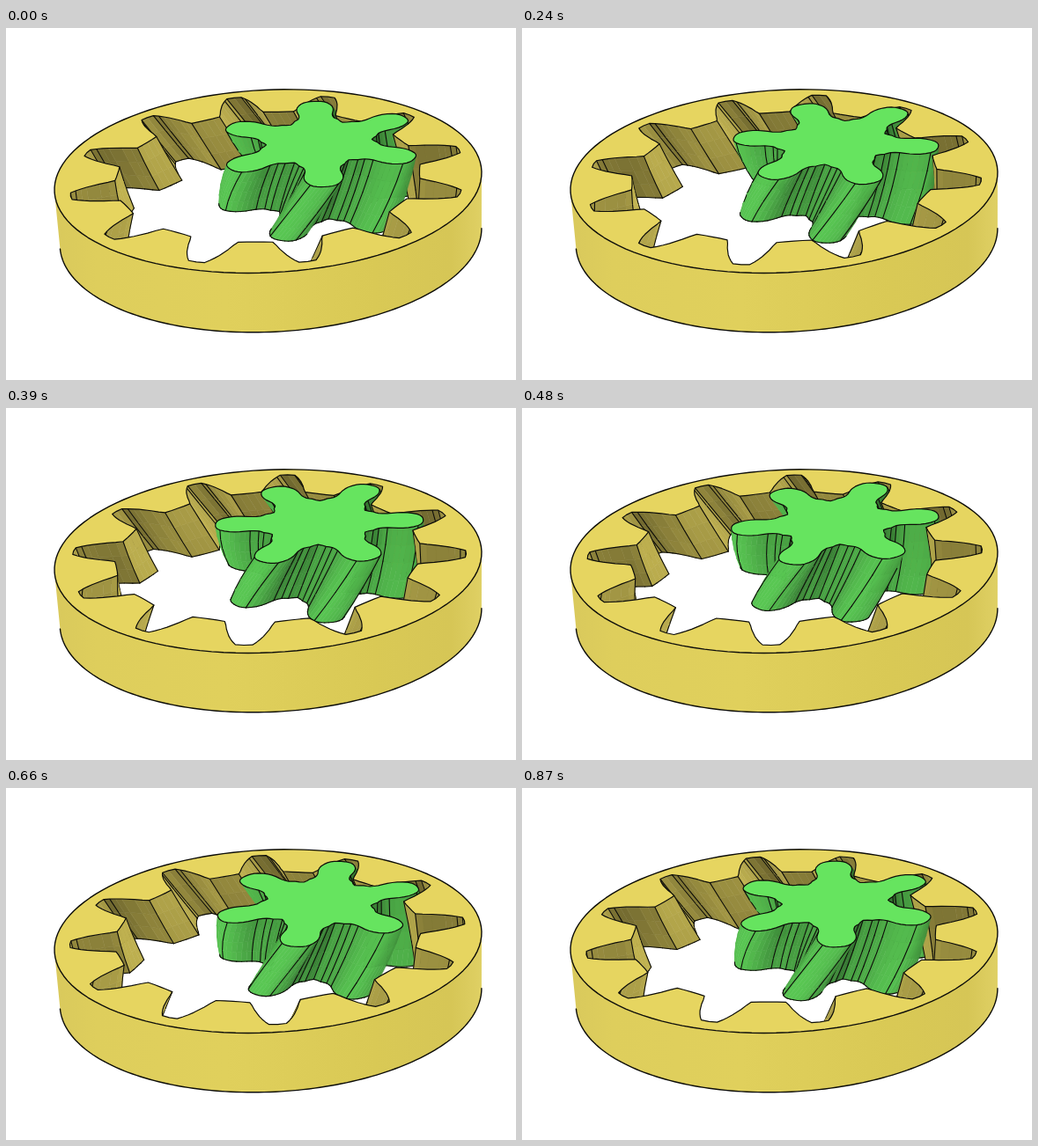
Recreate the animation shown at these times as an HTML page with a canvas. Size 579x400 px, loop 0.9 s.

```html
<!DOCTYPE html>
<html lang="en">
<head>
<meta charset="utf-8">
<title>Helical internal gear pair</title>
<style>
  html, body { margin: 0; width: 100%; height: 100%; overflow: hidden; background: #fff; }
  canvas { display: block; }
</style>
</head>
<body>
<canvas id="stage" width="579" height="400"></canvas>
<script>
const ctx = document.getElementById('stage').getContext('2d');
const RAD = Math.PI / 180;
const LOOP = 900, STEP = 30;

// Camera: the ring has radius 1, x points right, y to the viewer, h downwards.
const DIST = 9.457, FOCAL = 2285, SIN = 0.4255, COS = 0.905;
const ROLL = 2.8 * RAD, CX = 297, CY = 164.2;
const HEIGHT = 0.29;

function project(x, y, h) {
  const z = DIST - y * COS + h * SIN;
  const px = FOCAL * x / z, py = FOCAL * (y * SIN + h * COS) / z;
  return {
    x: CX + px * Math.cos(ROLL) + py * Math.sin(ROLL),
    y: CY - px * Math.sin(ROLL) + py * Math.cos(ROLL),
    z
  };
}

// Half outlines in polar form: radius, angle from the axis, edge mark.
const toPolar = ([a, w, edge]) => [Math.hypot(a, w), Math.atan2(w, a) / RAD, edge];

const pocket = [
  [0.929, 0, 0], [0.926, 2.3, 1], [0.902, 3.3, 1], [0.877, 4.2, 0], [0.85, 5.1, 0],
  [0.79, 6.8, 0], [0.75, 7.8, 0], [0.718, 8.9, 1], [0.713, 12, 0], [0.712, 15, 0]
];

const tooth = [
  [0.503, 0, 0], [0.498, 0.036, 0], [0.477, 0.066, 1], [0.43, 0.088, 0], [0.38, 0.091, 0],
  [0.33, 0.083, 1], [0.288, 0.088, 1], [0.262, 0.108, 1], [0.222, 0.128, 1]
].map(toPolar);

// Mirrors the half outline and repeats it round the wheel.
function wheel(half, count) {
  const back = half.slice(1).reverse().map(([r, a, e]) => [r, -a, e]);
  const unit = back.slice(1).concat(half);
  const pts = [];
  for (let i = 0; i < count; i++) {
    for (const [r, a, e] of unit) pts.push({ r, a: (a + i * 360 / count) * RAD, e });
  }
  return pts;
}

// Inserts a Catmull-Rom midpoint into every segment.
function smooth(pts) {
  const n = pts.length, out = [];
  const xy = pts.map(p => [p.r * Math.cos(p.a), p.r * Math.sin(p.a)]);
  pts.forEach((p, i) => {
    const mid = k => (9 * (xy[i][k] + xy[(i + 1) % n][k])
      - xy[(i + n - 1) % n][k] - xy[(i + 2) % n][k]) / 16;
    const x = mid(0), y = mid(1);
    out.push(p, { r: Math.hypot(x, y), a: Math.atan2(y, x), e: 0 });
  });
  return out;
}

const ring = {
  pts: wheel(pocket, 12), x: 0, y: 0, phase: 20.5, speed: 1, twist: 11.5, layers: 3,
  side: 1, color: [230, 213, 96],
  light: (nx, ny, r) => 0.48 + 0.08 * (0.93 - r) / 0.22 + 0.25 * Math.abs(nx) + 0.03 * nx
};

const pinion = {
  pts: smooth(wheel(tooth, 6)), x: 0.256, y: -0.317, phase: 29.5, speed: 2, twist: 25, layers: 4,
  side: -1, color: [102, 228, 95],
  light: (nx, ny, r) => 0.5 + 0.17 * (r - 0.25) / 0.25 + 0.2 * (0.8 * ny - 0.6 * nx)
};

const shade = (c, k) => `rgb(${c.map(v => Math.round(v * k)).join()})`;

function outline(gear, turn, depth) {
  const shift = (gear.phase - gear.speed * turn + gear.twist * depth) * RAD;
  return gear.pts.map(p => {
    const x = gear.x + p.r * Math.cos(p.a + shift);
    const y = gear.y + p.r * Math.sin(p.a + shift);
    return Object.assign(project(x, y, depth * HEIGHT), { wx: x, wy: y });
  });
}

function trace(pts, close = true) {
  pts.forEach((p, i) => i ? ctx.lineTo(p.x, p.y) : ctx.moveTo(p.x, p.y));
  if (close) ctx.closePath();
}

function stroke(pts, close, width = 1.2, color = '#0c0c08') {
  ctx.beginPath();
  trace(pts, close);
  ctx.lineWidth = width;
  ctx.strokeStyle = color;
  ctx.stroke();
}

// Collects the wall facets and edges that face the camera.
function walls(gear, turn, list) {
  const n = gear.pts.length, lift = 0.035;
  let top = outline(gear, turn, 0);
  for (let l = 1; l <= gear.layers; l++) {
    const low = outline(gear, turn, l / gear.layers);
    const front = top.map((p, i) => {
      const q = top[(i + 1) % n], b = low[i];
      return gear.side * ((q.x - p.x) * (b.y - p.y) - (q.y - p.y) * (b.x - p.x)) > 0;
    });
    for (let i = 0; i < n; i++) {
      const j = (i + 1) % n, p = top[i], q = top[j];
      const z = (p.z + q.z + low[i].z + low[j].z) / 4;
      if (front[i]) {
        const dx = q.wx - p.wx, dy = q.wy - p.wy;
        const len = Math.hypot(dx, dy) * -gear.side;
        const k = gear.light(dy / len, -dx / len, (gear.pts[i].r + gear.pts[j].r) / 2);
        list.push({ pts: [p, q, low[j], low[i]], z, fill: shade(gear.color, k) });
        if (l === gear.layers) list.push({ pts: [low[i], low[j]], z: z - lift });
      }
      if (gear.pts[i].e && (front[i] || front[(i + n - 1) % n])) {
        list.push({ pts: [p, low[i]], z: (p.z + low[i].z) / 2 - lift });
      }
    }
    top = low;
  }
}

function arc(from, to, h) {
  const pts = [];
  for (let i = 0; i <= 120; i++) {
    const a = (from + (to - from) * i / 120) * RAD;
    pts.push(project(Math.cos(a), Math.sin(a), h));
  }
  return pts;
}

const rim = arc(0, 360, 0);
const rimFront = arc(6.7, 173.3, 0);
const baseFront = arc(6.7, 173.3, HEIGHT);
const sideFill = ctx.createLinearGradient(55, 0, 540, 0);
[[0, '#d9c95c'], [0.1, '#dece5c'], [0.4, '#e0d05c'], [0.75, '#d9c955'], [0.93, '#d6c656'], [1, '#dfd064']]
  .forEach(s => sideFill.addColorStop(...s));

function draw(turn) {
  const hole = outline(ring, turn, 0);
  const face = outline(pinion, turn, 0);
  ctx.fillStyle = '#fff';
  ctx.fillRect(0, 0, 579, 400);
  ctx.lineJoin = ctx.lineCap = 'round';

  ctx.beginPath();
  trace(rimFront.concat(baseFront.slice().reverse()));
  ctx.fillStyle = sideFill;
  ctx.fill();
  stroke(baseFront, false, 1.4);

  ctx.beginPath();
  trace(rim);
  trace(hole);
  ctx.fillStyle = shade(ring.color, 1);
  ctx.fill('evenodd');
  stroke(rim, true, 1.4);

  // Everything below the top plane is seen only through the hole.
  ctx.save();
  ctx.beginPath();
  trace(hole);
  ctx.clip();
  const list = [];
  walls(ring, turn, list);
  walls(pinion, turn, list);
  list.sort((a, b) => b.z - a.z);
  for (const f of list) {
    if (f.fill) {
      ctx.fillStyle = f.fill;
      ctx.beginPath();
      trace(f.pts);
      ctx.fill();
      stroke(f.pts, true, 0.6, f.fill);
    } else {
      stroke(f.pts, false, 1.1);
    }
  }
  ctx.restore();
  stroke(hole, true);

  ctx.beginPath();
  trace(face);
  ctx.fillStyle = shade(pinion.color, 1);
  ctx.fill();
  stroke(face, true);
}

let last = -1;
function tick() {
  const step = Math.floor(performance.now() % LOOP / STEP);
  if (step !== last) draw(last = step);
  requestAnimationFrame(tick);
}
tick();
</script>
</body>
</html>
```
